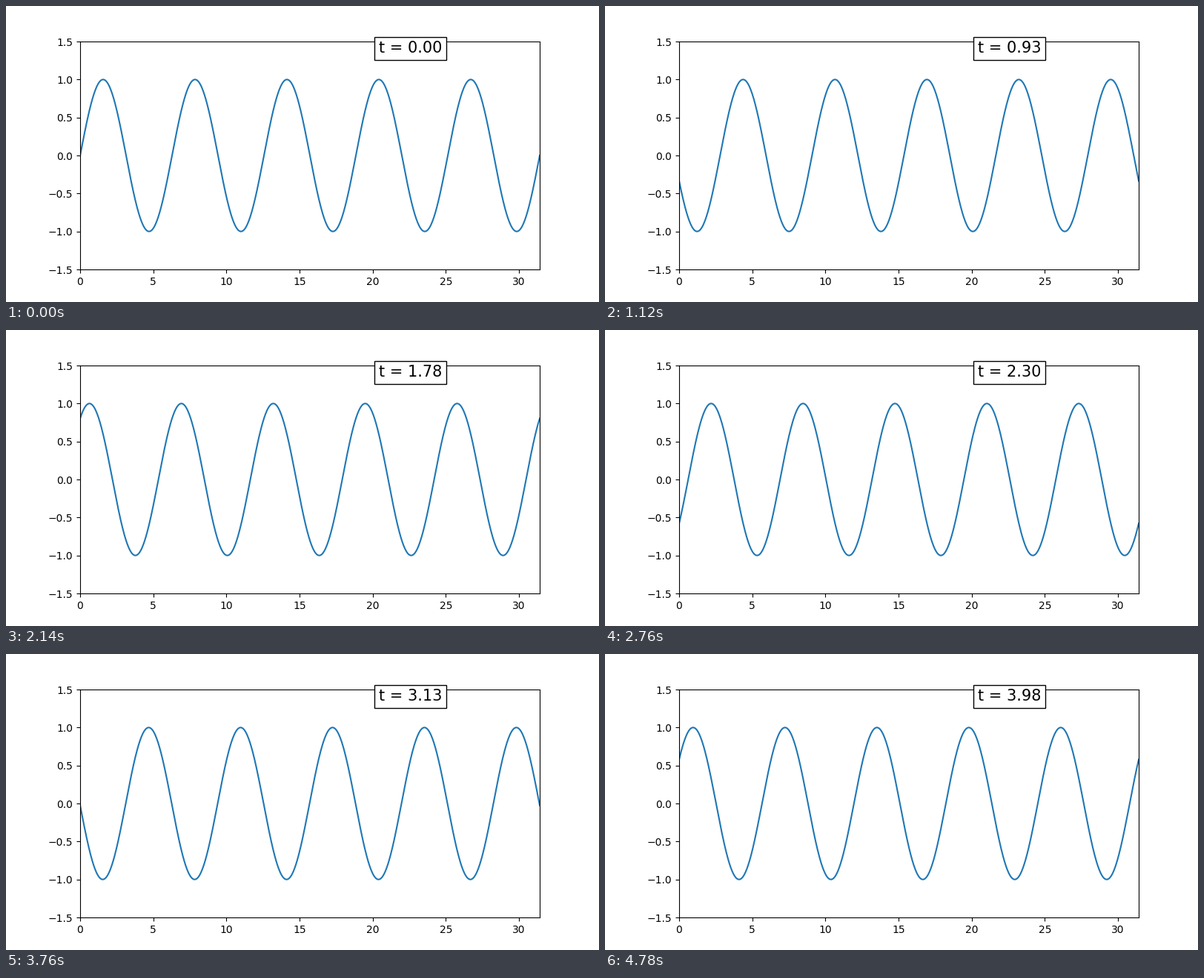
Write a matplotlib script that moves like this. It is 800x400 px and loops after 4800 ms.

```python
import numpy as np
import matplotlib.pyplot as plt
from matplotlib.animation import FuncAnimation

FRAMES = 240
INTERVAL = 20      # ms
RATE = 60          # frames per unit of t
OMEGA = 3.0        # angular speed of the wave

x = np.linspace(0, 10 * np.pi, 1000)

fig, ax = plt.subplots(figsize=(8, 4), dpi=100)
ax.set_xlim(0, 10 * np.pi)
ax.set_ylim(-1.5, 1.5)
wave, = ax.plot(x, np.sin(x))
label = ax.text(0.65, 0.95, "t = 0.00", transform=ax.transAxes, fontsize=15,
                bbox=dict(facecolor="white", edgecolor="black"))


def update(frame):
    t = frame / RATE
    wave.set_ydata(np.sin(x - OMEGA * t))
    label.set_text(f"t = {t:.2f}")
    return wave, label


anim = FuncAnimation(fig, update, frames=FRAMES, interval=INTERVAL,
                     repeat=True, repeat_delay=0, blit=False)
plt.show()
```
